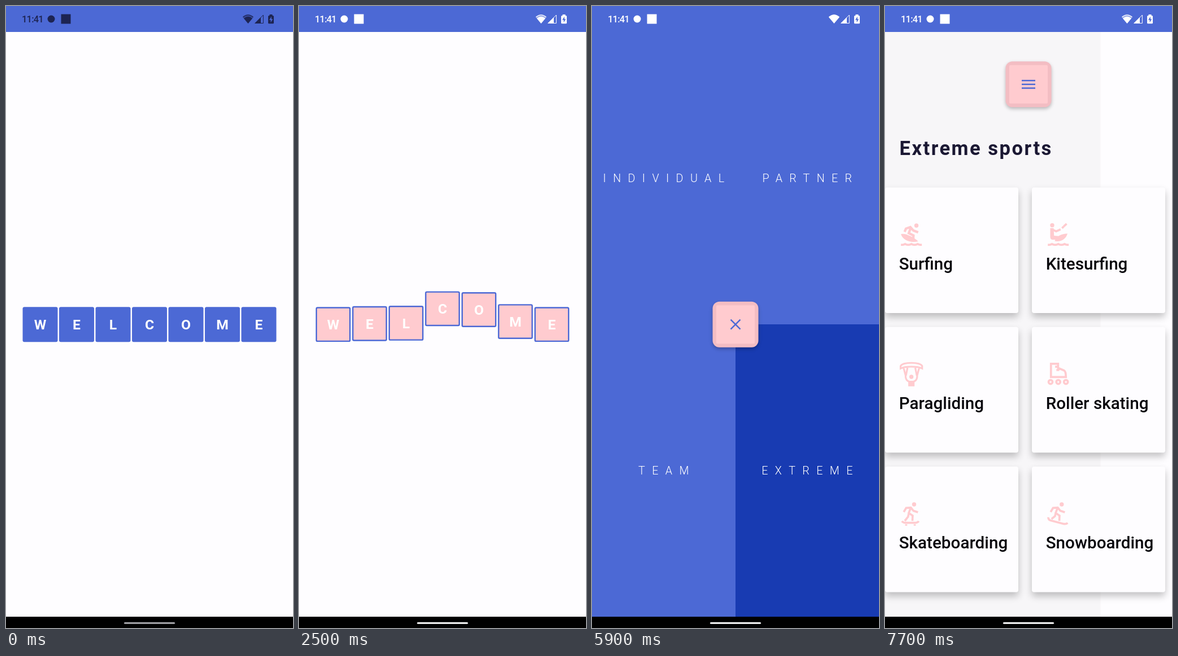
Recreate the animation shown at these times as an HTML page with a canvas. Size 508 px wide and 1102 px high, loop 8000 ms.

```html
<!DOCTYPE html>
<html lang="en">
<head>
<meta charset="utf-8">
<title>Sports menu</title>
<style>
html, body { margin: 0; width: 100%; height: 100%; overflow: hidden; background: #fefdff; }
canvas { display: block; width: 508px; height: 1102px; }
</style>
</head>
<body>
<canvas id="stage"></canvas>
<script>
const W = 508, H = 1102, TOP = 46, BOTTOM = 1082, CX = 254, CY = 564.2, LOOP = 8000;
const BLUE = '#4c69d5', DARK = '#082da8', PINK = '#ffcbcf', ROSE = '#f3bdc3', PAPER = '#fefdff';
const FONT = 'px Roboto, sans-serif';
const canvas = document.getElementById('stage'), ctx = canvas.getContext('2d');
const dpr = window.devicePixelRatio || 1;
canvas.width = W * dpr;
canvas.height = H * dpr;

const span = (t, start, length) => Math.min(1, Math.max(0, (t - start) / length));
const easeOut = p => 1 - (1 - p) ** 3;
const easeInOut = p => p < .5 ? 2 * p * p : 1 - 2 * (1 - p) ** 2;
const mix = (a, b, p) => a + (b - a) * p;

function group(draw) {
  ctx.save();
  draw();
  ctx.restore();
}
function box(x, y, w, h, r, color) {
  ctx.fillStyle = color;
  ctx.beginPath();
  ctx.roundRect(x, y, w, h, r);
  ctx.fill();
}
function lines(d, width, color) {
  ctx.strokeStyle = color;
  ctx.lineWidth = width;
  ctx.stroke(new Path2D(d));
}
function shape(d, color) {
  ctx.fillStyle = color;
  ctx.fill(new Path2D(d));
}
function dot(x, y, r, color) {
  ctx.fillStyle = color;
  ctx.beginPath();
  ctx.arc(x, y, r, 0, 7);
  ctx.fill();
}
function text(str, x, y, font, color, align = 'left', spacing = 0) {
  ctx.font = font + FONT;
  ctx.fillStyle = color;
  ctx.textAlign = align;
  ctx.letterSpacing = spacing + 'px';
  ctx.fillText(str, x, y);
}
function shadow(alpha, y, blur) {
  ctx.shadowColor = `rgba(0,0,0,${alpha})`;
  ctx.shadowOffsetY = y * dpr;
  ctx.shadowBlur = blur * dpr;
}

// Height of a tile's hop, by milliseconds since take-off
function hop(age) {
  if (age <= 0 || age >= 480) return 0;
  if (age < 230) return 31 * easeInOut(age / 230);
  if (age < 343) return 31 * (1 - ((age - 230) / 113) ** 2);
  const p = (age - 343) / 137;
  return 16 * p * (1 - p);
}

function tiles(t) {
  [...'WELCOME'].forEach((letter, i) => group(() => {
    const turn = span(t, 310 + 200 * i, 300);
    ctx.translate(60.5 + 64.5 * i, CY - hop(t - 1935 - 100 * i));
    ctx.scale(1, Math.abs(Math.cos(Math.PI * turn)));
    if (turn < .5) {
      box(-31, -31, 62, 62, 3, BLUE);
    } else {
      box(-29, -29, 58, 58, 1, PINK);
      ctx.strokeStyle = BLUE;
      ctx.lineWidth = 2.4;
      ctx.beginPath();
      ctx.roundRect(-29.7, -29.7, 59.4, 59.4, 2);
      ctx.stroke();
    }
    text(letter, 0, 8.9, '700 24.7', '#fff', 'center');
  }));
}

function welcome(t) {
  const e = easeOut(span(t, 4000, 500));
  if (e >= 1) return;
  group(() => {
    if (e > 0) {
      const k = 1 - e;
      ctx.beginPath();
      ctx.rect(CX - 254 * k, CY - 154 * k, 508 * k, 308 * k);
      ctx.clip();
      ctx.translate(-254 * e, -154 * e);
      ctx.globalAlpha = k;
    }
    tiles(t);
  });
}

// Three bars at 0, a cross at 1
function menuIcon(p) {
  const a = Math.PI / 4 * p, half = 12;
  ctx.strokeStyle = BLUE;
  ctx.lineWidth = 2.5;
  for (const side of [-1, 0, 1]) group(() => {
    if (!side) ctx.globalAlpha *= 1 - p;
    ctx.translate(0, 6.7 * side * (1 - p));
    ctx.rotate(a * side);
    ctx.beginPath();
    ctx.moveTo(-half, 0);
    ctx.lineTo(half, 0);
    ctx.stroke();
  });
}

function button(t) {
  const e = easeOut(span(t, 4000, 500));
  if (!e) return;
  const y = mix(CY, 138.8, easeInOut(span(t, 5930, 567)));
  group(() => {
    if (e < 1) {
      ctx.beginPath();
      ctx.rect(CX - 40.5 * e, y - 40.5 * e, 81 * e, 81 * e);
      ctx.clip();
      ctx.globalAlpha = e;
    }
    const shift = -40.5 * (1 - e);
    ctx.translate(CX + shift, y + shift);
    group(() => {
      shadow(.26, 3, 6);
      box(-40.5, -40.5, 81, 81, 12, ROSE);
    });
    box(-34, -34, 68, 68, 2, PINK);
    menuIcon(span(t, 4600, 160) - span(t, 6350, 200));
  });
}

function panels(t) {
  const away = t < 5600 ? 1 - easeOut(span(t, 4597, 400)) : span(t, 5931, 400) ** 3;
  if (away >= 1) return;
  ['INDIVIDUAL', 'PARTNER', 'TEAM', 'EXTREME'].forEach((name, i) => group(() => {
    const right = i % 2, low = i >> 1;
    ctx.translate((right - .5) * 2 * 254 * away, (low - .5) * 2 * 518 * away);
    const x = right * 254, y = TOP + low * 518;
    box(x, y, 254, 518, 0, BLUE);
    if (i === 3) {
      ctx.globalAlpha = span(t, 5840, 80);
      box(x, y, 254, 518, 0, DARK);
      ctx.globalAlpha = 1;
    }
    text(name, x + 133, y + 266.2, '300 19.76', '#fff', 'center', 12.35);
  }));
}

const WAVES = 'M21 23c-1 0-2-.25-3-.75-1.9 1-4.1 1-6 0-1.9 1-4.1 1-6 0-1 .5-2 .75-3 .75H2v-2h1c1 0 2-.35 3-1 1.8 1.3 4.2 1.3 6 0 1.8 1.3 4.2 1.3 6 0 .9.65 2 1 3 1h1v2Z';
const RIDER = 'M4.7 10.5 7 6.6 11.5 6.2 14 9.3 18.3 10.8M11.3 6.8 9.5 11.4 13.2 14 13 19';
// Each sport: name, strokes, stroke width, fills, head [x, y]
const SPORTS = [
  ['Surfing', 'M5.5 9.5 6.8 6.4 11 5 14 8.3 18.5 10M11.3 6 9.5 10.8 14 13 13.8 17', 2.3,
    WAVES + 'M2 11.8C6 10.5 14 14.5 18.5 18.6 12 20.4 4 18.2 2 11.8Z', [16.8, 3.5]],
  ['Kitesurfing', 'M6 7.2 10 9 14.2 7.2M15.6 6 17.3 4.3M17.3 4.3 20 1.8', 2,
    WAVES + 'M4.3 6H7.5L8 13.2 13 13.6 13 17H6Q4.3 16.5 4.3 14ZM8.5 18.4C10 14 15 11.2 20.8 11.2 19.5 16 15 19.5 8.5 18.4Z', [6.2, 3.2]],
  ['Paragliding', 'M1.7 6.7V4.3C4 .3 20 .3 22.3 4.3V6.7C18 4.4 6 4.4 1.7 6.7ZM4.5 6 6.5 13.5M8.3 6 6.8 13.5M19.5 6 17.5 13.5M15.7 6 17.2 13.5M6.5 13V15Q7 18.5 10 19.3H14Q17 18.5 17.5 15V13', 1.7,
    'M9 18.5H15V23.8H9Z', [12, 14.7]],
  ['Roller skating', 'M5 2.2H11.8V6.2L17.5 8.6Q19.3 9.6 19.3 14.9H5ZM12 5H9M13 8.2H10.2M6.5 19.6a1.9 1.9 0 1 1-3.8 0 1.9 1.9 0 1 1 3.8 0M13.9 19.6a1.9 1.9 0 1 1-3.8 0 1.9 1.9 0 1 1 3.8 0M21.2 19.6a1.9 1.9 0 1 1-3.8 0 1.9 1.9 0 1 1 3.8 0', 2, ''],
  ['Skateboarding', RIDER + 'M9.6 11.5 8.8 15 5.7 19M3 19.2Q4 20.8 6 20.8H16Q18 20.8 19 19.2', 2,
    'M6 22.3h2v1.3h-2ZM14.2 22.3h2v1.3h-2Z', [14.6, 3.2]],
  ['Snowboarding', RIDER + 'M9.6 11.5 8.8 14.5 5.5 17.2M2.4 15.5Q2.4 18 4.8 18.6L17 21.8Q19.5 22.3 21 21', 2, '', [15.3, 3.2]]
];

function card(t, [name, strokes, width, fills, head], i) {
  const p = easeOut(span(t, 6750 + 100 * i, 375));
  if (!p) return;
  group(() => {
    ctx.globalAlpha = p;
    ctx.translate(i % 2 * 260 + 118, 321.5 + 247.3 * (i >> 1) + 111);
    ctx.scale(p, p);
    ctx.translate(-118, -111);
    group(() => {
      shadow(.24, 7, 13);
      box(0, 0, 236, 222.5, 4, PAPER);
    });
    text(name, 24.7, 145.2, '500 29.64', '#08070c');
    ctx.translate(24.5, 61);
    ctx.scale(1.85, 1.85);
    lines(strokes, width, PINK);
    shape(fills, PINK);
    if (head) dot(...head, 2, PINK);
  });
}

function sportsPage(t) {
  const p = span(t, 6350, 330);
  if (!p) return;
  group(() => {
    ctx.globalAlpha = p;
    box(0, TOP, 381.5, BOTTOM - TOP, 0, '#f7f6f8');
    text('Extreme sports', 25.5, 264, '700 34.58', '#1b1833', 'left', 2.47);
  });
}

function bars(t) {
  const p = span(t, 30, 350), tone = (a, b, c) => `rgb(${[a, b, c].map(v => mix(v, 255, p))})`;
  const ink = tone(29, 36, 82);
  box(0, 0, W, TOP, 0, BLUE);
  text('11:41', 28, 29, '500 16.5', ink, 'left', -.8);
  dot(80, 23, 6.5, ink);
  box(97.5, 14.5, 17, 17, 0, ink);

  const full = t >= 3000 && t < 6000;
  group(() => {
    ctx.globalAlpha = full ? 1 : .45;
    shape('M428.5 31 419 19.8Q428.5 11 438 19.8Z', ink);
  });
  if (!full) shape('M428.5 31 421 22Q428.5 15.5 436 22Z', ink);
  lines('M419.5 19.5Q428.5 12 437.5 19.5', 1.2, ink);

  shape('M440 31 451 20V31Z', ink);
  lines('M441 30.5H455.4V16Z', 1, ink);
  box(464, 17, 10, 14.3, 1.5, ink);
  box(466.5, 15, 5, 3, 0, ink);
  shape('M469.8 18.7 466 24.8H468.6V29.2L472.2 23.2H469.8Z', BLUE);

  box(0, BOTTOM, W, H - BOTTOM, 0, '#000');
  box(209, 1091.7, 90, 3, 1.5, tone(170, 170, 175));
}

function frame(now) {
  const t = now % LOOP;
  ctx.setTransform(dpr, 0, 0, dpr, 0, 0);
  box(0, 0, W, H, 0, PAPER);
  welcome(t);
  sportsPage(t);
  panels(t);
  button(t);
  SPORTS.forEach((sport, i) => card(t, sport, i));
  bars(t);
}

const began = performance.now();
function tick() {
  frame(performance.now() - began);
  requestAnimationFrame(tick);
}
tick();
</script>
</body>
</html>
```
